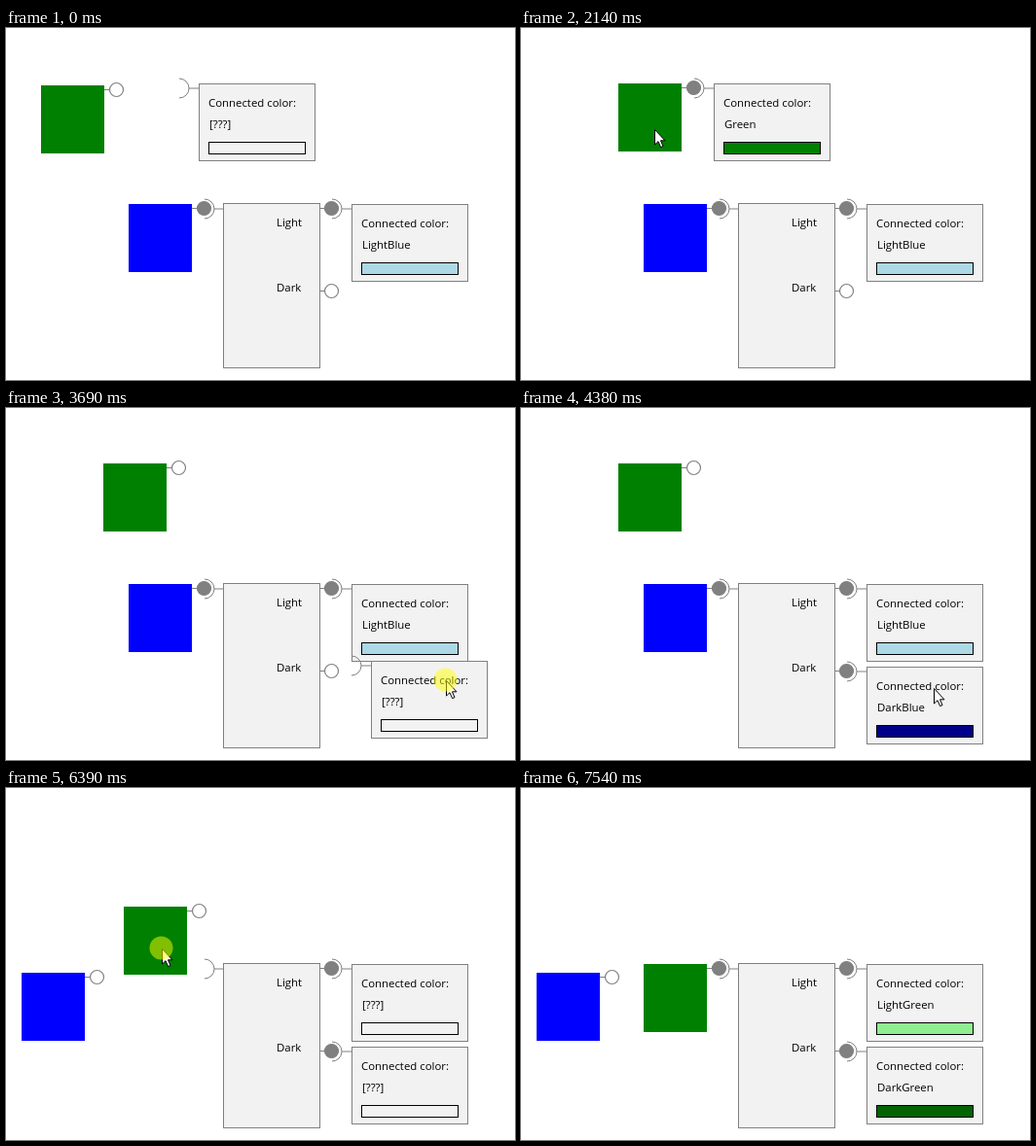
Recreate the animation shown at these times as an HTML page. Size 523 px wide and 362 px high, loop 8400 ms.

```html
<!DOCTYPE html>
<html lang="en">
<head>
<meta charset="utf-8">
<title>Connected colors</title>
<style>
html, body { margin: 0; width: 100%; height: 100%; overflow: hidden; background: #fff; }
svg { display: block; }
text { font: 11.4px "Open Sans", "Noto Sans", sans-serif; fill: #000; }
.panel { fill: #f2f2f2; stroke: #808080; }
.wire { fill: none; stroke: #808080; }
.plug { stroke: #808080; stroke-width: 1.2; }
</style>
</head>
<body>
<svg id="stage" width="523" height="362" viewBox="0 0 523 362"></svg>
<script>
const LOOP = 8400;
const stage = document.getElementById('stage');

function add(parent, tag, attrs, label) {
  const el = document.createElementNS('http://www.w3.org/2000/svg', tag);
  for (const k in attrs) el.setAttribute(k, attrs[k]);
  if (label) el.textContent = label;
  parent.appendChild(el);
  return el;
}
const group = () => add(stage, 'g', {});
const plug = (g, x, y) => add(g, 'circle', { class: 'plug', cx: x, cy: y, r: 7, fill: '#fff' });
const wire = (g, d) => add(g, 'path', { class: 'wire', d });
const socket = (g, x, y, end) =>
  wire(g, `M${x} ${y - 10}a10 10 0 0 1 0 20M${x + 10} ${y}H${end}`);
const fill = (el, on) => el.setAttribute('fill', on ? '#808080' : '#fff');

function place(g, [x, y]) {
  g.setAttribute('transform', `translate(${Math.round(x)} ${Math.round(y)})`);
}

function makeSource(color, home) {
  const g = group();
  wire(g, 'M65 4.5H71');
  add(g, 'rect', { width: 65, height: 70, fill: color });
  return { g, home, plug: plug(g, 77.5, 4.5) };
}

function makeDisplay(home) {
  const g = group();
  socket(g, -20, 5, 0);
  add(g, 'rect', { class: 'panel', x: .5, y: .5, width: 119, height: 79 });
  add(g, 'text', { x: 10, y: 24 }, 'Connected color:');
  place(g, home);
  return {
    g, home,
    value: add(g, 'text', { x: 11, y: 46 }),
    swatch: add(g, 'rect', { x: 10.5, y: 60.5, width: 99, height: 12, stroke: '#000' })
  };
}

const hub = group();
socket(hub, 204, 186, 223);
wire(hub, 'M323 185.5H328M323 270.5H328');
add(hub, 'rect', { class: 'panel', x: 223.5, y: 180.5, width: 99, height: 169 });
add(hub, 'text', { x: 278, y: 204 }, 'Light');
add(hub, 'text', { x: 278, y: 271 }, 'Dark');
fill(plug(hub, 334.5, 185.5), true);
const darkPlug = plug(hub, 334.5, 270.5);

const fixed = makeDisplay([355, 181]);
const moving = makeDisplay([198, 57]);
const blue = makeSource('#0000ff', [126, 181]);
const green = makeSource('#008000', [36, 59]);
const cursor = group();
add(cursor, 'path', {
  d: 'M.5 .5V16L4 12.7L6.6 18.6L9 17.6L6.5 11.8H11Z',
  fill: '#fff', stroke: '#000'
});
const glow = add(cursor, 'circle', { r: 12, fill: '#ff0', cx: -.5, cy: -.5 });

// The mouse: [time, x, y]
const route = [
  [70, 341, 302], [600, 59, 101], [680, 59, 101], [1130, 112, 98], [1290, 114, 108],
  [2065, 114, 108], [2600, 275, 77], [2770, 275, 77], [2920, 317, 76],
  [3610, 454, 267], [3690, 452, 280], [4080, 424, 288], [4475, 424, 288],
  [5010, 158, 210], [5160, 158, 210], [5320, 101, 217], [5470, 48, 219],
  [5630, 48, 219], [6000, 139, 100], [6080, 139, 100], [6390, 160, 165],
  [6620, 159, 216], [6900, 160, 222], [7470, 338, 333]
];

// An item follows the mouse from down to drop, then rests at its dock.
const drags = [
  { item: green, down: 680, drop: 1230, up: 1400, grab: [23, 42], dock: [100, 57] },
  { item: moving, down: 2770, drop: 3920, up: 4380, grab: [77, 20], dock: [355, 266] },
  { item: blue, down: 5160, drop: 5470, up: 5470, grab: [32, 29], dock: [16, 190] },
  { item: green, down: 6080, drop: 6620, up: 6900, grab: [39, 43], dock: [126, 181] }
];
const [greenIn, boxMove, blueOut, greenMove] = drags;

function mouse(t) {
  const i = route.findIndex(p => p[0] > t);
  if (i < 1) return route[i ? route.length - 1 : 0].slice(1);
  const [a, x, y] = route[i - 1], [b, u, v] = route[i];
  const k = (t - a) / (b - a);
  return [x + (u - x) * k, y + (v - y) * k];
}

function position(item, t, tip) {
  const drag = drags.filter(d => d.item === item && t >= d.down).pop();
  if (!drag) return item.home;
  return t < drag.drop ? tip.map((v, i) => v - drag.grab[i]) : drag.dock;
}

function show(display, name) {
  display.value.textContent = name || '[???]';
  display.swatch.setAttribute('fill', name ? name.toLowerCase() : '#f2f2f2');
}

function draw(t) {
  const tip = mouse(t);
  for (const item of [green, blue, moving]) place(item.g, position(item, t, tip));
  place(cursor, tip);

  const direct = t >= greenIn.drop && t < boxMove.down + 40;
  const dark = t >= boxMove.drop;
  const input = t < blueOut.down + 40 ? 'Blue' : t >= greenMove.drop ? 'Green' : '';
  fill(green.plug, direct || input === 'Green');
  fill(blue.plug, input === 'Blue');
  fill(darkPlug, dark);
  show(fixed, input && 'Light' + input);
  show(moving, direct ? 'Green' : dark && input ? 'Dark' + input : '');

  cursor.setAttribute('visibility', t >= 70 && t < 7540 ? 'visible' : 'hidden');
  const press = drags.find(d => t >= d.down && t < d.up);
  glow.setAttribute('opacity', !press ? 0 : press.up - t < 78 ? .25 : .5);
}

const start = performance.now();
function tick() {
  draw((performance.now() - start) % LOOP);
  requestAnimationFrame(tick);
}
tick();
</script>
</body>
</html>
```
